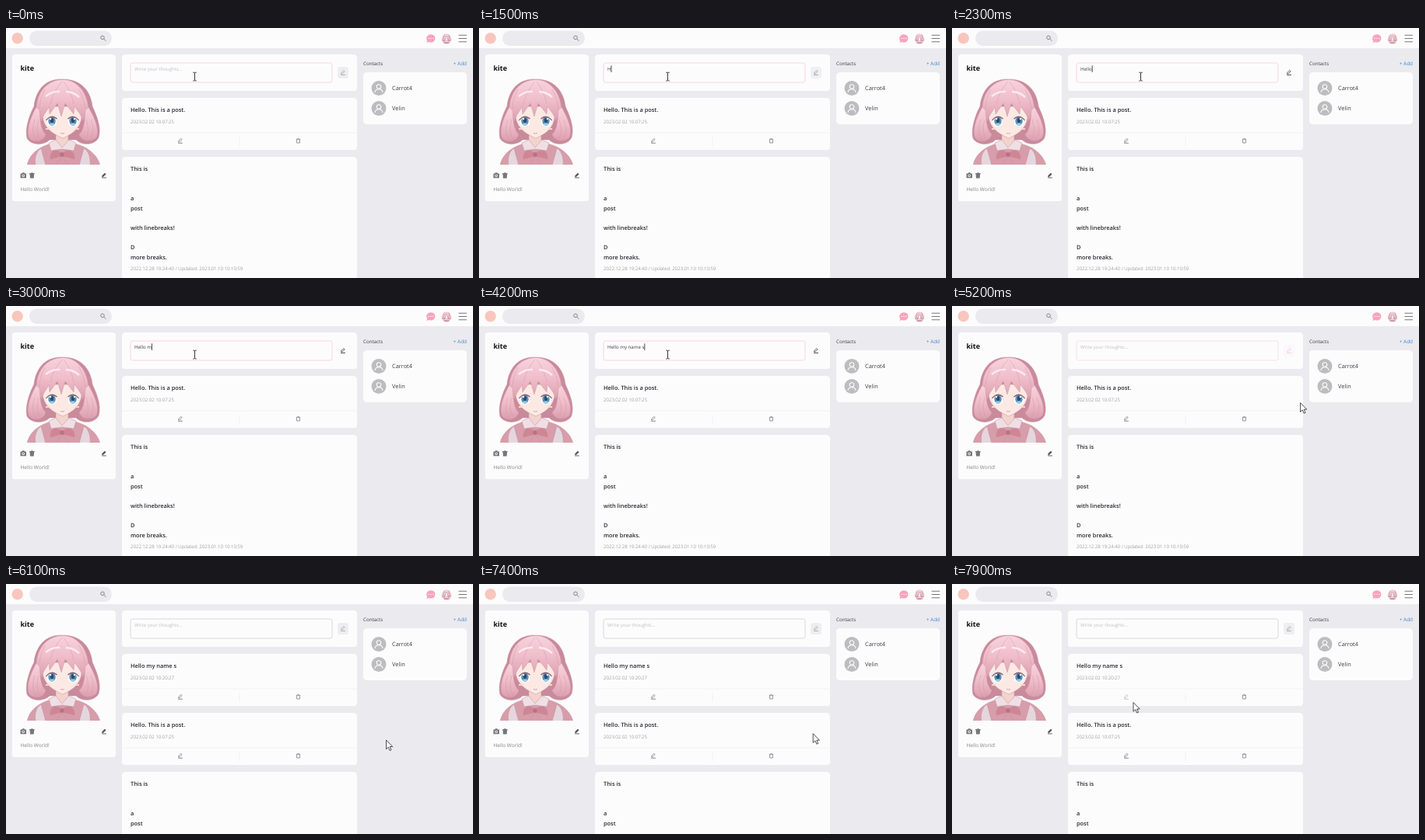
An HTML page that plays this animation: 600x322 px, repeating every 8 s.

```html
<!DOCTYPE html>
<html lang="en">
<head>
<meta charset="utf-8">
<title>Social feed</title>
<style>
  html, body { margin: 0; width: 100%; height: 100%; overflow: hidden; background: #ebeaee; }
  svg { display: block; width: 600px; height: 322px; font: 6.1px "Open Sans", "Noto Sans", sans-serif; }
  text { white-space: pre; fill: #3c3c43; text-rendering: geometricPrecision; }
  .card { fill: #fdfcfd; filter: drop-shadow(0 .5px .7px #0002); }
  .bold { font-size: 7.4px; font-weight: 600; fill: #29292f; }
  .light { font-weight: 300; fill: #6c6b71; }
  .name { font-size: 7.4px; }
  .rule { stroke: #eeedf1; stroke-width: .8; }
</style>
</head>
<body>
<svg viewBox="0 0 600 322">
  <defs>
    <linearGradient id="hair" x2="0" y2="1">
      <stop stop-color="#f7d3dc"/><stop offset=".5" stop-color="#f0bdca"/><stop offset="1" stop-color="#dc9eae"/>
    </linearGradient>
    <symbol id="pencil" viewBox="-4 -4 8 8" overflow="visible">
      <path d="M-2.5 1.5 -2.1 -.1 .9 -2.9 2.2 -1.7 -.9 1.3Z" fill="inherit" stroke="currentColor" stroke-width=".75"/>
      <path d="M-2.9 2.9H2.9" stroke="currentColor" stroke-width=".9"/>
    </symbol>
    <symbol id="bin" viewBox="-4 -4 8 8" overflow="visible">
      <path d="M-2.6-2H2.6M-1-2.7H1M-1.9-2V2.7H1.9V-2" fill="none" stroke="currentColor" stroke-width=".75"/>
    </symbol>
    <g id="person">
      <circle r="9.5" fill="#bdbcbf"/>
      <g fill="none" stroke="#fff" stroke-width="1.1">
        <circle cy="-2" r="2.8"/><path d="M-5 5.5C-4.5-.1 4.5-.1 5 5.5"/>
      </g>
    </g>
    <clipPath id="round"><circle cx="566" cy="14" r="6.6"/></clipPath>
    <clipPath id="frame"><path d="M19 65H129V176H19Z"/></clipPath>
    <g id="portrait" clip-path="url(#frame)" stroke-linejoin="round">
      <g stroke="#c48f9e" stroke-width=".5">
        <path d="M73 66C48 65 38 83 36 101C30 112 24 130 27 142C32 151 48 152 56 144H90C98 152 114 151 119 141C123 128 116 112 111 101C109 82 97 66 73 66Z" fill="#c98a9b"/>
        <path d="M27 177C30 161 45 152 58 149H88C103 152 117 162 121 177Z" fill="#d79daa"/>
        <path d="M64 136H80V151L72 157 64 151Z" fill="#f3d3cd"/>
        <path d="M55 148 64 144 72 154 81 144 90 148 87 158 72 156 58 158Z" fill="#efdfe4"/>
        <path d="M38 177C36 166 40 158 45 155L51 177ZM94 177 100 155C106 158 109 167 108 177Z" fill="#e5d6dd"/>
        <path d="M72 162C63 153 56 159 57 169L72 165 88 169C89 159 81 153 72 162ZM72 165 64 177M72 165 81 177" fill="#d08595"/>
        <circle cx="72" cy="163" r="3" fill="#bd6f80"/>
        <path d="M47 101C45 119 49 132 73 142C96 132 99 119 97 101Z" fill="#fce9e4"/>
      </g>
      <g id="eye">
        <path d="M52 119Q58 111 65 119V124Q58 130 53 124Z" fill="#fff"/>
        <ellipse cx="59" cy="120" rx="4.7" ry="5.7" fill="#5a90b8"/>
        <ellipse cx="59" cy="119" rx="2.2" ry="3.2" fill="#2d4a6f"/>
        <ellipse cx="59" cy="124" rx="3" ry="1.6" fill="#98cfe3"/>
        <circle cx="57" cy="117" r="1.3" fill="#fff"/>
        <path d="M51.5 119Q58 110.5 65.5 117" fill="none" stroke="#805363" stroke-width="1.2"/>
      </g>
      <use href="#eye" transform="matrix(-1 0 0 1 145 0)"/>
      <path d="M51 130H56M89 130H94" stroke="#f9d2cf" stroke-width="2"/>
      <path d="M70 135.5Q72.5 136.5 75 135.5" fill="none" stroke="#c98389" stroke-width=".7"/>
      <g fill="url(#hair)" stroke="#cc9cab" stroke-width=".5">
        <path d="M73 66.5C53 66.5 39 83 39 105C43 112 42 115 46 120C48 110 53 108 55 101L56 111 66 97 71 114 76 97 87 111 88 101C93 109 97 111 98 120C103 114 102 109 106 105C105 84 92 66.5 73 66.5Z"/>
        <path d="M39 102C32 114 25 132 30 142C37 149 49 146 51 137C44 131 44 117 43 106ZM106 102C113 114 121 131 116 141C109 148 97 146 94 137C101 131 101 117 102 106Z"/>
        <path d="M72 69Q61 81 57 98M74 69Q84 82 87 98M50 79Q43 92 43 104M94 79Q101 91 102 104M37 118Q31 133 39 145M109 118Q116 133 107 145M42 118Q37 135 45 145M103 118Q109 135 101 145" fill="none"/>
      </g>
      <path d="M51 88Q60 81 69 82M77 82Q86 82 94 89" fill="none" stroke="#fdeaef" stroke-width="2.4"/>
    </g>
  </defs>

  <rect width="600" height="322" fill="#ebeaee"/>

  <g id="feed"></g>
  <g id="newPost"></g>

  <rect class="card" width="600" height="26"/>
  <circle cx="14.7" cy="13.2" r="7.2" fill="#f9c6bd"/>
  <rect x="30" y="3.5" width="106" height="19.5" rx="9.7" fill="#ebeaee"/>
  <g fill="none" stroke="#88878c">
    <circle cx="124" cy="12.3" r="2.3"/><path d="m125.7 14 2.8 2.8"/>
    <path d="M581.5 9.2H592M581.5 13.5H592M581.5 17.8H592" stroke="#77767b" stroke-width="1.1"/>
  </g>
  <path d="M546 8.2c7.2 0 7.2 10.4 0 10.4q-1.5 0-2.7-.5l-3 .9.9-2.6c-2.4-3.3-.3-8.2 4.8-8.2Z" fill="#f9a3bc"/>
  <path d="M543 13.4h.1M545.9 13.4h.1M548.8 13.4h.1" stroke="#fff" stroke-width="1.4" stroke-linecap="round"/>
  <g clip-path="url(#round)">
    <path d="M559 7h14v14h-14Z" fill="#f7eef1"/>
    <use href="#portrait" transform="translate(557.2 -.5) scale(.12)"/>
  </g>

  <rect class="card" x="7.5" y="34" width="133.5" height="189.5" rx="4"/>
  <text x="18.5" y="55" style="font-size:9px;font-weight:700;fill:#111">kite</text>
  <use href="#portrait"/>
  <g fill="#77767a">
    <path d="M18.5 187.5H20.3L21 186.3H23.5L24.2 187.5H26V193.3H18.5Z"/>
    <circle cx="22.2" cy="190.2" r="1.7" fill="#fff"/><circle cx="22.2" cy="190.2" r=".9"/>
    <path d="M30 187H32L32.4 186.2H34.4L34.8 187H36.7V188.2H36.1L35.7 193.5H31L30.6 188.2H30Z"/>
  </g>
  <use href="#pencil" x="122" y="186" width="8" height="8" color="#55545a" fill="#55545a"/>
  <text x="18.5" y="210.3" style="font-size:6.5px;fill:#838287">Hello World!</text>

  <rect class="card" x="149" y="34" width="302" height="47.5" rx="4"/>
  <rect id="field" x="160" y="45" width="259" height="25" rx="2.5" fill="#fdfcfd" stroke-width=".8"/>
  <text id="hint" x="165" y="54.6" style="fill:#bfbec3">Write your thoughts...</text>
  <text id="typed" x="165" y="54.6"></text>
  <path id="caret" d="M.5 48.3V57" stroke="#222" stroke-width=".8"/>
  <rect id="sendBox" x="426" y="50" width="14" height="15" rx="3" fill="#eeedf0"/>
  <use id="send" href="#pencil" x="429" y="53.5" width="8" height="8" fill="none"/>

  <text x="459" y="47.5" style="font-size:6.2px">Contacts</text>
  <text x="592" y="47.8" text-anchor="end" style="font-size:6.4px;fill:#3d87d6">+ Add</text>
  <rect class="card" x="459" y="57" width="133" height="67" rx="4"/>
  <use href="#person" x="479" y="77.5"/><text class="name" x="496" y="80.3">Carrot4</text>
  <use href="#person" x="479" y="103.5"/><text class="name" x="496" y="106.3">Velin</text>

  <path id="beam" d="M-2.2-5.3H-.6L0-4.7.6-5.3H2.2M0-4.7V4.9M-2.2 5.5H-.6L0 4.9.6 5.5H2.2" fill="none" stroke="#222" stroke-width=".9"/>
  <path id="arrow" d="M0 0V11.7L2.7 9.2 4.6 13.5 6.5 12.7 4.6 8.5H8.2Z" fill="#fff" stroke="#222" stroke-width=".8"/>
</svg>
<script>
const LOOP = 8000, POSTED = 5300, CLICK = 5000, SHIFT = 76;
const MESSAGE = "Hello my name s";
const KEYS = [1500, 1800, 2200, 2200, 2300, 2500, 2800, 3100, 3200, 3300, 3400, 3500, 3600, 3700, 3900];
const $ = id => document.getElementById(id);

const icon = (id, x, y) => `<use href="#${id}" x="${x - 4}" y="${y - 4}" width="8" height="8"/>`;

function post(y, lines, date, height = 67.5) {
  const last = y + 18.2 + (lines.length - 1) * 12.6;
  const text = lines.map((line, i) => `<text class="bold" x="160" y="${y + 18.2 + i * 12.6}">${line}</text>`).join("");
  const foot = y + height - 12.2;
  return `<rect class="card" x="149" y="${y}" width="302" height="${height}" rx="4"/>${text}
    <text class="light" x="160" y="${last + 14.4}">${date}</text>
    <path class="rule" d="M149 ${foot - 10.3}H451M300 ${foot - 5}V${foot + 7}"/>
    <g color="#77767b" fill="none"><g class="edit">${icon("pencil", 224, foot)}</g>${icon("bin", 375.5, foot)}</g>`;
}

$("feed").innerHTML = post(90, ["Hello. This is a post."], "2023.02.02 10:07:25") +
  post(166, ["This is", "", "", "a", "post", "", "with linebreaks!", "", "D", "more breaks."],
    "2022.12.28 19:24:40 / Updated: 2023.01.10 10:10:59", 181);
$("newPost").innerHTML = post(90, [MESSAGE], "2023.02.02 10:20:27");
const newEdit = $("newPost").querySelector(".edit");

// Interpolates rows of [time, ...values]
function track(t, rows) {
  const i = rows.findIndex(row => row[0] > t);
  if (i < 0) return rows.at(-1).slice(1);
  if (i === 0) return rows[0].slice(1);
  const a = rows[i - 1], b = rows[i], k = (t - a[0]) / (b[0] - a[0]);
  return a.slice(1).map((v, j) => v + (b[j + 1] - v) * k);
}

const POINTER = [
  [4250, 242.5, 62.5], [4500, 335, 60], [4700, 424, 58], [4850, 435, 58], [5000, 435, 60],
  [5100, 439, 82], [5200, 447.5, 124.5], [5500, 474, 178], [5900, 488.5, 201],
  [7250, 488.5, 201], [7450, 410, 190], [7700, 272, 160], [7900, 233, 152.5]
];
// Box opacity, then icon colour
const SEND = [
  [1450, 1, 165, 164, 169], [1900, 0, 50, 49, 55], [4700, 0, 50, 49, 55],
  [4900, 0, 244, 172, 190], [5200, .2, 248, 200, 212], [5500, 1, 165, 164, 169]
];
const BORDER = [[CLICK, 250, 200, 213], [5200, 246, 217, 225], [5500, 207, 206, 212]];

const rgb = c => `rgb(${c})`;
const show = (id, on) => $(id).style.display = on ? "" : "none";

function draw(t) {
  const cleared = t >= CLICK + 100;
  const count = cleared ? 0 : KEYS.filter(k => k <= t).length;
  $("typed").textContent = MESSAGE.slice(0, count);
  show("hint", !count);
  const sinceKey = count ? t - KEYS[count - 1] : t + 660;
  show("caret", t < CLICK && Math.floor(sinceKey / 530) % 2 === 0);
  $("caret").setAttribute("transform", `translate(${165 + (count ? $("typed").getComputedTextLength() : 0)})`);

  $("field").setAttribute("stroke", rgb(track(t, BORDER)));
  const [box, ...ink] = track(t, SEND);
  $("sendBox").setAttribute("opacity", box);
  $("send").setAttribute("color", rgb(ink));

  show("newPost", t >= POSTED);
  $("feed").setAttribute("transform", `translate(0 ${t >= POSTED ? SHIFT : 0})`);
  newEdit.setAttribute("opacity", track(t, [[7720, 1], [7880, .5]])[0]);

  const [x, y] = track(t, POINTER);
  const overField = x < 419 && y < 70;
  show("beam", overField);
  show("arrow", !overField);
  $(overField ? "beam" : "arrow").setAttribute("transform", `translate(${x} ${y})`);
}

function tick() {
  draw(performance.now() % LOOP);
  requestAnimationFrame(tick);
}
tick();
</script>
</body>
</html>
```
